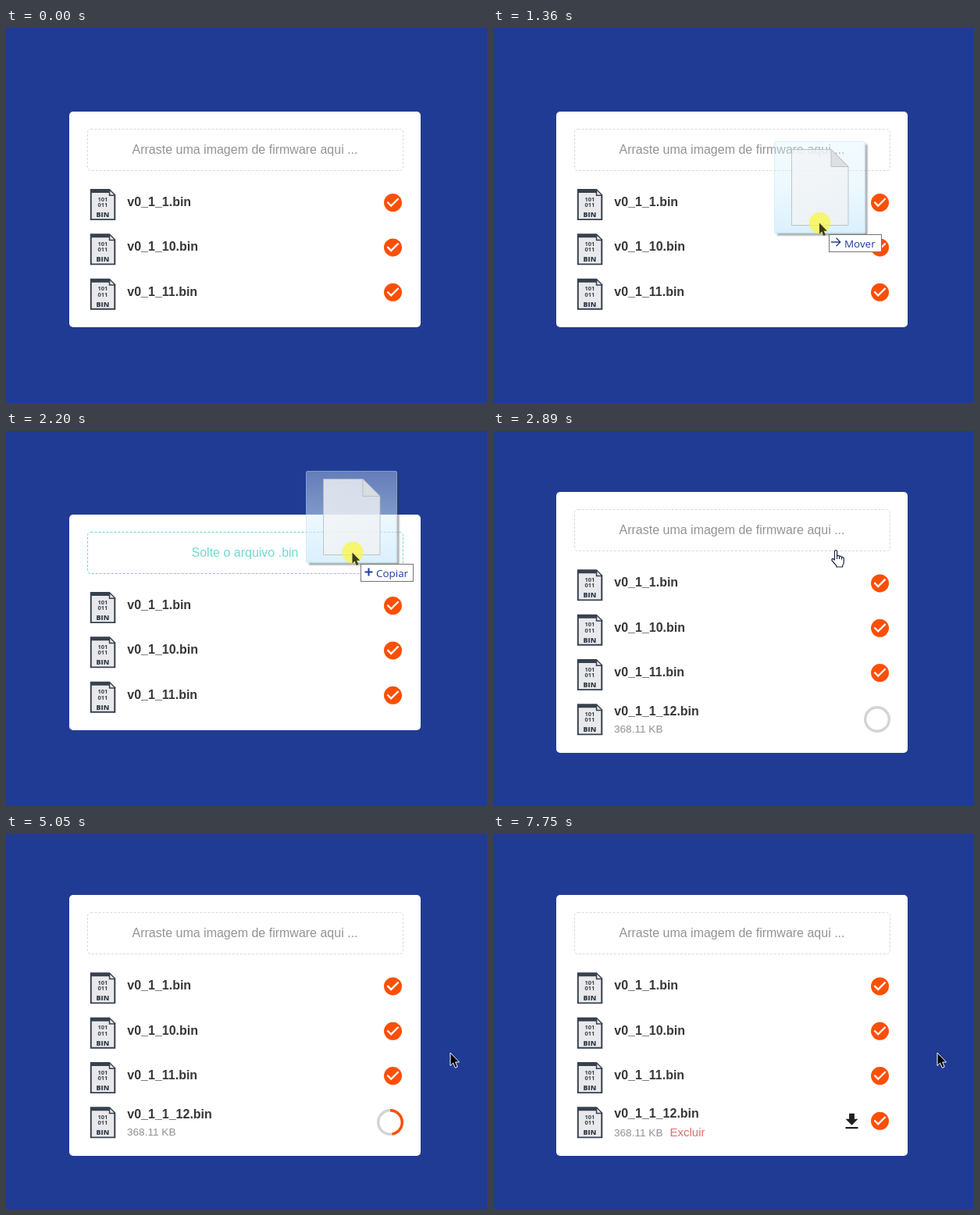
Animation, 616 px wide and 480 px high, one loop 8000 ms. Source, as an HTML page:

```html
<!DOCTYPE html>
<html lang="pt">
<head>
<meta charset="utf-8">
<title>Envio de firmware</title>
<style>
  html, body { margin: 0; width: 100%; height: 100%; overflow: hidden; background: #203b93; }
  svg { display: block; width: 616px; height: 480px; }
  text { font-family: "Liberation Sans", Arial, sans-serif; font-size: 16px; }
  .name { font-weight: bold; fill: #373737; }
  .size { font-size: 13.6px; fill: #929292; }
  .remove { font-size: 15px; fill: #dd6d6d; }
  .zone rect { fill: none; stroke: #d8d8d8; stroke-dasharray: 3 2; }
  .zone text { fill: #939393; text-anchor: middle; }
  .zone.hot rect { stroke: #62dccb; }
  .zone.hot text { fill: #6fdccb; }
  .icon text { font: 700 7.5px "Open Sans", "Noto Sans", sans-serif; fill: #37414e; text-anchor: middle; }
  .icon .ext { font-size: 9px; font-weight: 800; }
  .tip text { font: 13.4px "Open Sans", "Noto Sans", sans-serif; fill: #1f3c9d; }
  .tip path { fill: none; stroke: #1f3c9d; }
</style>
</head>
<body>
<svg viewBox="0 0 616 480">
  <defs>
    <linearGradient id="glass" x2="0" y2="1">
      <stop offset="0" stop-color="#dcf3fd" stop-opacity=".36"/>
      <stop offset=".45" stop-color="#dcf3fd" stop-opacity=".5"/>
      <stop offset="1" stop-color="#c8e9fc" stop-opacity=".68"/>
    </linearGradient>
    <linearGradient id="paper" x2="1" y2="1">
      <stop offset="0" stop-color="#f3f5f6"/>
      <stop offset="1" stop-color="#eef1f4"/>
    </linearGradient>
    <filter id="blur" x="-20%" y="-20%" width="140%" height="140%"><feGaussianBlur stdDeviation="1.3"/></filter>
    <g id="icon" class="icon">
      <path d="M0 0H25L32.5 7.5V40H0Z" fill="#37414e"/>
      <path d="M2 5H24V9H30.5V38.2H2Z" fill="#e9e9eb"/>
      <path d="M25.5 2.5L30.5 7.5H25.5Z" fill="#e9e9eb"/>
      <text x="16" y="15.6">101</text>
      <text x="16" y="23">011</text>
      <text class="ext" x="16" y="36">BIN</text>
    </g>
    <g id="check">
      <circle r="11.5" fill="#fc4f05"/>
      <path d="M-2.3 5.7L-7.9 0L-6.3 -1.6L-2.3 2.4L6.3 -6.1L7.9 -4.5Z" fill="#fff"/>
    </g>
    <path id="arrow" d="M0 0V16.5L3.7 13L6.3 19.3L9.2 18L6.6 12H11.5Z"/>
  </defs>

  <rect width="616" height="480" fill="#203b93"/>
  <rect id="card" x="81" width="450" rx="5" fill="#fff"/>
  <g id="zone" class="zone">
    <rect x="104.5" y="129.5" width="404" height="53" rx="4"/>
    <text x="306" y="161"></text>
  </g>
  <g id="rows"></g>

  <g id="upload">
    <use href="#icon" x="107.8" y="349.3"/>
    <text id="newName" class="name" x="155.3">v0_1_1_12.bin</text>
    <text id="newSize" class="size" x="155">368.11 KB</text>
    <g id="ring" fill="none" stroke-width="3.4" transform="rotate(-90 492 369)">
      <circle cx="492" cy="369" r="15.3" stroke="#d4d4d4"/>
      <circle id="arc" cx="492" cy="369" r="15.3" stroke="#fc4f05" pathLength="360"/>
    </g>
    <g id="done">
      <text class="remove" x="226.5" y="387">Excluir</text>
      <path d="M19 9h-4V3H9v6H5l7 7 7-7zM5 18v2h14v-2z" fill="#212121" transform="translate(445.8 354.4) scale(1.14)"/>
      <use href="#check" x="495.5" y="367.3"/>
    </g>
  </g>

  <g id="ghost">
    <path d="M118 4V119H4" fill="none" stroke="#333" stroke-opacity=".55" stroke-width="2.4" filter="url(#blur)"/>
    <rect x=".5" y=".5" width="116" height="117" rx="1.5" fill="url(#glass)" stroke="#b4e2ef" stroke-opacity=".5"/>
    <path d="M22.5 10.5H73L95 32.5V107.5H22.5Z" fill="url(#paper)" fill-opacity=".8" stroke="#b3b8bb" stroke-opacity=".8"/>
    <path d="M73 10.5L95 32.5H73Z" fill="#d9dde0" fill-opacity=".9" stroke="#b3b8bb" stroke-opacity=".8"/>
    <g id="tip" class="tip">
      <rect x="70.5" y="119.5" width="67" height="22" fill="#fff" stroke="#757575"/>
      <path id="moveMark" d="M73 129H84.5M79.5 123.8L84.8 129L79.5 134.2" stroke-width="1.3"/>
      <path id="copyMark" d="M75.5 129.5H85.5M80.5 124.5V134.5" stroke-width="2"/>
      <text id="tipText" x="90" y="136"></text>
    </g>
    <g id="grab">
      <circle cx=".5" cy="0" r="13.7" fill="#fbf63c" fill-opacity=".72"/>
      <use href="#arrow" fill="#3b3b1a" transform="scale(.85)"/>
    </g>
  </g>

  <use id="pointer" href="#arrow" fill="#000" stroke="#fff"/>
  <path id="hand" transform="translate(433 152)" fill="#fff" stroke="#1c2340" stroke-width="1.2" stroke-linejoin="round"
    d="M4.5 13V2.3Q4.5 .7 6 .7T7.6 2.3V8Q10 6.6 10.6 8.6Q13 7.4 13.5 9.6Q16.3 8.8 16.3 11.5V15.5Q16.3 18 14.7 20V22H6.8V20.3L1.2 14Q.2 11.6 2.4 11.4ZM7.6 8V12M10.6 8.6V12M13.5 9.6V12.4"/>
</svg>
<script>
const LOOP = 8000, TICK = 76.67, SHIFT = 28.67;
const DROP = 2890, HOT = 1730, DONE = 7750;
const bursts = [0, 500, 1200, 2200, 2510, 2890, 3060];

// time, left, top, pointer offset inside the dragged image
const dragPath = [
  [500, 560, 223, 48], [655, 452, 228, 51], [807, 374, 212, 54], [960, 319, 195, 58],
  [1195, 319, 195, 58], [1200, 332, 180, 58], [1353, 360, 145, 58.5], [1620, 381, 92, 60],
  [1890, 387, 53, 60], [2199, 387, 53, 60], [2200, 384, 51, 60], [2276, 384, 50, 60],
  [2509, 384, 50, 60], [2510, 382, 50, 60], [2586, 380, 49, 60]
];
const pointerPath = [[3060, 450, 162], [3250, 506, 196], [3440, 555, 230], [3630, 580, 262], [3820, 569, 280]];

const $ = id => document.getElementById(id);
const show = (id, on) => $(id).setAttribute("display", on ? "inline" : "none");
const move = (id, x, y) => $(id).setAttribute("transform", `translate(${x} ${y})`);
const zoneText = document.querySelector("#zone text");

function along(path, t) {
  if (t <= path[0][0]) return path[0].slice(1);
  const i = path.findIndex(p => p[0] > t);
  if (i < 0) return path[path.length - 1].slice(1);
  const a = path[i - 1], b = path[i], k = (t - a[0]) / (b[0] - a[0]);
  return a.slice(1).map((v, j) => v + (b[j + 1] - v) * k);
}

function snap(t) {
  const start = bursts.filter(s => s <= t).pop();
  return start + Math.floor((t - start + 5) / TICK) * TICK;
}

function layout(dropped) {
  const dy = dropped ? SHIFT : 0;
  $("card").setAttribute("y", dropped ? 78 : 107);
  $("card").setAttribute("height", dropped ? 334 : 276);
  move("zone", 0, dropped ? -29 : 0);
  $("rows").innerHTML = ["v0_1_1.bin", "v0_1_10.bin", "v0_1_11.bin"].map((name, i) => {
    const y = 206 + i * 57.33 - dy;
    return `<use href="#icon" x="107.8" y="${y}"/>
      <text class="name" x="155.3" y="${Math.round(y + 22)}">${name}</text>
      <use href="#check" x="495.5" y="${y + 17.6}"/>`;
  }).join("");
}

let wasDropped = null;

function draw(time) {
  const t = snap(time);
  const dropped = time >= DROP, done = time >= DONE;
  const hot = t >= HOT && !dropped;
  if (dropped !== wasDropped) layout(wasDropped = dropped);

  $("zone").classList.toggle("hot", hot);
  zoneText.textContent = hot ? "Solte o arquivo .bin" : "Arraste uma imagem de firmware aqui ...";

  show("ghost", time >= 500 && !dropped);
  const [x, y, grip] = along(dragPath, t);
  move("ghost", Math.round(x), Math.round(y));
  move("grab", grip - 0.5, 104.5);
  show("moveMark", !hot);
  show("copyMark", hot);
  $("tipText").textContent = hot ? "Copiar" : "Mover";

  show("hand", dropped && time < 3060);
  show("pointer", time >= 3060);
  move("pointer", ...along(pointerPath, t));

  show("upload", dropped);
  show("ring", !done);
  show("done", done);
  $("newName").setAttribute("y", done ? 363 : 364);
  $("newSize").setAttribute("y", done ? 387 : 386);
  const angle = t < 3060 ? 0 : Math.min(360, (t - 2930) * 0.08);
  $("arc").setAttribute("stroke-dasharray", `${angle} 400`);
  show("arc", angle > 0);
}

const begin = performance.now();
function frame() {
  draw((performance.now() - begin) % LOOP);
  requestAnimationFrame(frame);
}
frame();
</script>
</body>
</html>
```
